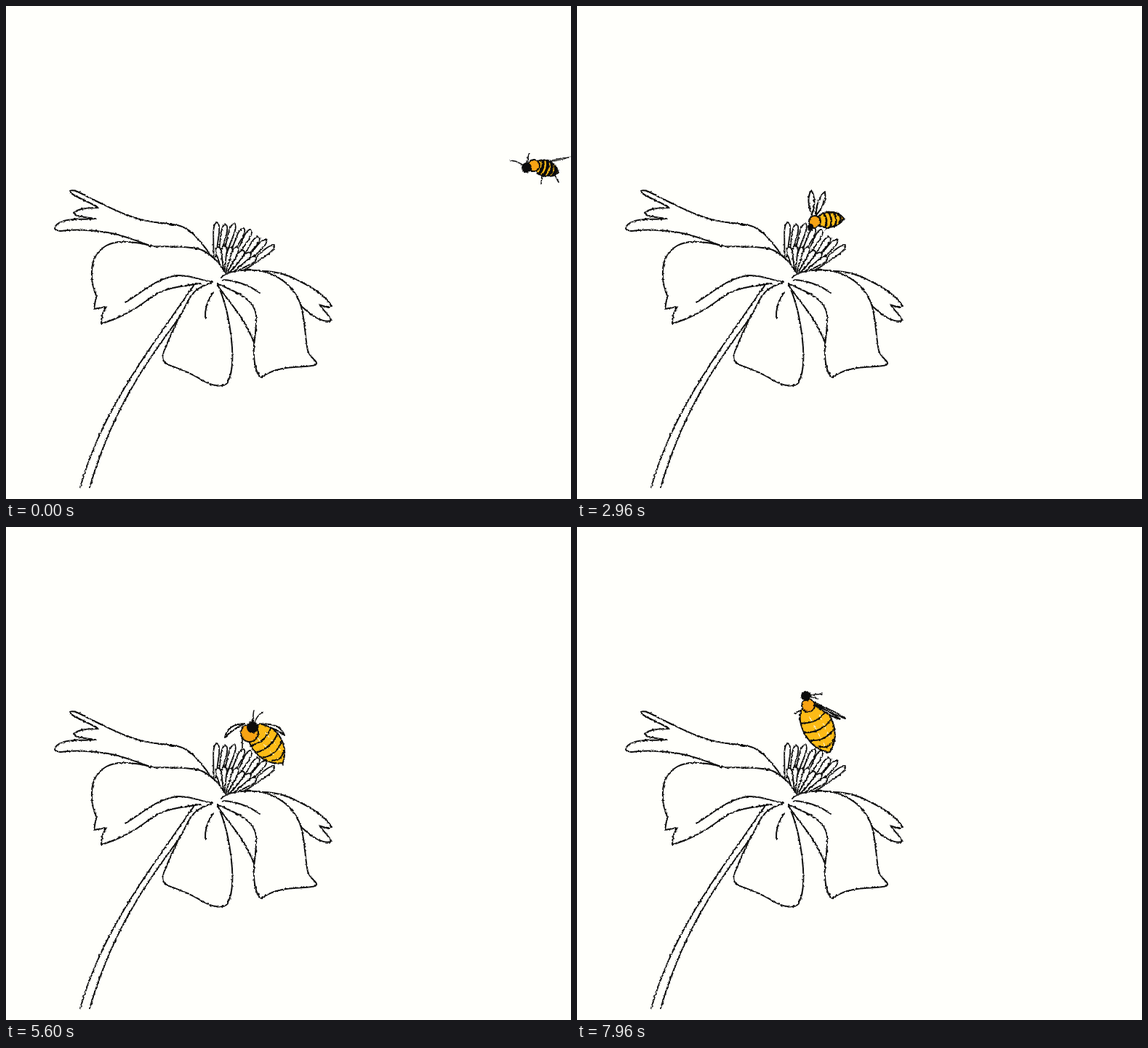
Recreate the animation shown at these times as an HTML page. Size 777 by 677 pixels, loop 8 s.

```html
<!DOCTYPE html>
<html lang="en">
<head>
<meta charset="utf-8">
<title>Bee on a flower</title>
<style>
  html, body { margin: 0; width: 100%; height: 100%; overflow: hidden; background: #fffffb; }
  svg { display: block; width: 777px; height: 677px; }
  g { fill: none; stroke: #0c0c0c; stroke-width: 2; stroke-linecap: round; stroke-linejoin: round; }
</style>
</head>
<body>
<svg viewBox="0 0 777 677">
  <defs>
    <filter id="rough0" filterUnits="userSpaceOnUse" x="0" y="0" width="777" height="677" color-interpolation-filters="sRGB">
      <feTurbulence type="fractalNoise" baseFrequency=".3" numOctaves="2" seed="3"/>
      <feDisplacementMap in="SourceGraphic" scale="3" xChannelSelector="R" yChannelSelector="G"/>
    </filter>
    <filter id="rough1" filterUnits="userSpaceOnUse" x="0" y="0" width="777" height="677" color-interpolation-filters="sRGB">
      <feTurbulence type="fractalNoise" baseFrequency=".3" numOctaves="2" seed="8"/>
      <feDisplacementMap in="SourceGraphic" scale="3" xChannelSelector="R" yChannelSelector="G"/>
    </filter>
    <g id="shared">
      <!-- lower petal -->
      <path d="M291 382C302 406 307 430 310 458C313 485 311 506 304 518C298 524 284 522 270 514C250 501 236 498 224 493C216 489 214 484 216 478C222 460 232 440 240 424"/>
      <path d="M285 393C277 404 273 416 274 430"/>
      <!-- right petals -->
      <path d="M296 373C303 364 330 360 352 364C385 372 401 395 406 413C412 437 411 455 415 473C418 484 429 487 427 492C422 496 410 494 396 496C380 497 363 501 351 510C343 505 340 486 341 465C343 450 345 437 344 424C341 404 321 394 292 382"/>
      <path d="M348 364C375 363 393 372 410 381C427 390 440 400 448 412C442 415 436 412 431 410C437 419 446 426 447 432C436 436 420 425 406 412"/>
      <path d="M164 407C184 396 203 375 235 370C254 369 268 377 284 379"/>
    </g>
  </defs>
  <g id="flower0" filter="url(#rough0)">
    <use href="#shared"/>
    <path d="M284 345C267 323 255 305 236 301C216 297 202 298 184 293C158 286 138 274 118 265C106 259 95 251 88 254C88 260 112 267 127 277C112 277 99 278 93 284C97 290 110 290 123 292C104 294 82 290 70 300C65 305 66 308 75 309C100 306 118 308 140 311C164 315 182 324 202 330"/>
    <path d="M302 366C292 350 281 340 267 334C245 329 225 331 202 330C184 325 156 319 138 329C118 340 116 360 119 382C122 393 126 399 123 404L121 416L138 413C133 420 131 428 131 436C150 431 175 419 194 404C216 386 240 385 268 381"/>
    <path d="M298 376C318 377 335 384 349 394M294 388C310 410 329 430 341 462"/>
    <path d="M258 384C246 402 206 457 180 497C148 547 120 598 102 661M282 380C266 386 258 391 252 402L240 425C216 459 196 484 178 516C148 565 129 614 115 661"/>
  </g>
  <g id="flower1" filter="url(#rough1)">
    <use href="#shared"/>
    <path d="M275 338C258 317 247 306 230 302C202 299 183 292 160 285C141 278 127 271 113 264C106 257 96 253 87 256C91 264 110 268 127 277C112 277 99 278 93 283C97 290 110 290 123 292C104 295 82 288 68 299C65 303 74 308 80 310C106 309 128 309 150 314C170 319 182 327 198 333"/>
    <path d="M299 366C292 350 281 341 267 335C245 330 225 331 198 333C184 325 156 322 138 332C117 343 115 360 118 380C121 393 126 399 122 405L121 416L138 413C132 420 131 428 134 437C153 431 176 419 194 404C216 386 240 383 270 383"/>
    <path d="M299 376C318 377 332 383 344 394M297 388C310 410 326 430 341 455"/>
    <path d="M257 385C243 405 206 457 180 497C148 547 121 598 103 661M284 379C266 386 258 391 252 402L236 432C216 459 197 487 179 516C149 565 130 614 115 661"/>
  </g>
  <g id="bee" filter="url(#rough0)"></g>
</svg>
<script>
const LOOP = 8000, BEE_STEP = 80;
const PAPER = '#fffffb', INK = '#0c0c0c', GOLD = '#fdbb16', ORANGE = '#f8a314';
const byId = id => document.getElementById(id);

// Two rows of stamens: root x, y, tip x, y.
const backRow = [[287, 345, 290, 297], [294, 340, 302, 300], [301, 340, 314, 299], [309, 342, 327, 305],
  [317, 343, 337, 307], [325, 349, 348, 317], [326, 356, 358, 321], [328, 361, 369, 329]];
const frontRow = [[297, 358, 291, 331], [301, 364, 300, 329], [302, 365, 309, 331], [304, 365, 318, 331],
  [307, 364, 327, 336], [313, 363, 336, 339], [320, 361, 344, 345]];

function stamen([x, y, tx, ty]) {
  const dx = tx - x, dy = ty - y, len = Math.hypot(dx, dy);
  const at = (u, v) => `${x + dx * u - dy / len * v} ${y + dy * u + dx / len * v}`;
  return `<path fill="${PAPER}" stroke-width="1.8" d="M${at(0, -1.5)}L${at(.72, -4)}Q${at(.98, -4)} ${at(1, 0)}Q${at(.98, 4)} ${at(.72, 4)}L${at(0, 1.5)}"/>`;
}
const stamens = [...backRow, ...frontRow].map(stamen).join('');
for (const id of ['flower0', 'flower1']) byId(id).insertAdjacentHTML('beforeend', stamens);

// head, thorax: x, y, radius; body: front, tail, width; wings: root and tip twice;
// vane: bend, width; feelers: two tips; legs: root and tip twice.
const arriving = {
  head: [716, 222, 6], thorax: [726, 219, 8], body: [728, 219, 760, 228, 21], stripe: [4],
  wings: [746, 214, 776, 207, 748, 213, 774, 208], vane: [2, 0],
  feelers: [694, 212, 720, 202], legs: [737, 232, 736, 244, 754, 231, 760, 242]
};
const hovering = {
  head: [382, 240, 6], thorax: [391, 231, 9], body: [394, 224, 415, 250, 22], stripe: [3],
  wings: [389, 224, 404, 196, 402, 222, 430, 204], vane: [6, 0],
  feelers: [356, 236, 366, 234], legs: [384, 245, 385, 252, 403, 247, 405, 256]
};
const landed = {
  head: [321, 303, 3], thorax: [327, 296, 8], body: [332, 295, 367, 291, 21], stripe: [2.6],
  wings: [323, 287, 322, 253, 329, 287, 341, 255], vane: [0, 8],
  feelers: [318, 307, 320, 308], legs: [325, 302, 319, 308, 345, 303, 341, 308]
};
const dipping = {
  head: [322, 300, 2], thorax: [326, 297, 9], body: [327, 296, 391, 248, 43], stripe: [2],
  wings: [318, 288, 295, 262, 323, 284, 311, 253], vane: [0, 6],
  feelers: [316, 303, 319, 305], legs: [325, 301, 318, 306, 345, 299, 340, 307]
};
const perched = {
  head: [339, 275, 7], thorax: [335, 283, 12], body: [341, 277, 382, 323, 40], stripe: [2],
  wings: [328, 270, 301, 289, 352, 271, 383, 286], vane: [8, 5],
  feelers: [341, 252, 353, 255], legs: [325, 292, 325, 306, 379, 318, 381, 328]
};
const resting = { ...perched, wings: [328, 270, 306, 290, 352, 271, 381, 288], vane: [8, 8] };
const leaving = {
  head: [315, 232, 6], thorax: [318, 245, 9], body: [318, 246, 349, 309, 42], stripe: [2],
  wings: [326, 243, 369, 263, 327, 244, 362, 264], vane: [-1, 3],
  feelers: [337, 229, 331, 236], legs: [311, 250, 299, 256, 311, 251, 305, 265]
};

// Start time, pose, and the height of the arc towards the next pose.
const track = [[0, arriving, 24], [1120, hovering, 0], [1920, landed, 0], [2960, landed, 0], [3680, dipping, 0],
  [4400, dipping, 18], [5600, perched, 0], [5680, resting, 0], [7120, resting, 0], [7920, leaving, 0], [LOOP, leaving, 0]];

function poseAt(time) {
  const i = track.findLastIndex(key => key[0] <= time);
  const [start, from, lift] = track[i], [end, to] = track[i + 1];
  const k = (time - start) / (end - start), pose = {};
  for (const part in from) pose[part] = from[part].map((v, n) => v + (to[part][n] - v) * k);
  if (time < 1920 && time / BEE_STEP % 2) for (const n of [3, 7]) pose.wings[n] -= 10;
  pose.lift = -lift * Math.sin(Math.PI * k);
  return pose;
}

const disc = ([x, y, r], fill) => `<circle cx="${x}" cy="${y}" r="${r}" fill="${fill}"/>`;

function wing(x, y, tx, ty, bend, width) {
  const dx = tx - x, dy = ty - y, len = Math.hypot(dx, dy) || 1;
  const mid = v => `${x + dx * .6 + dy / len * v} ${y + dy * .6 - dx / len * v}`;
  const fill = width > 1 ? PAPER : 'none';
  return `<path fill="${fill}" stroke-width="${width > 1 ? 2 : 1.2}" d="M${x} ${y}Q${mid(bend + width)} ${tx} ${ty}Q${mid(bend - width)} ${x} ${y}"/>`;
}

function abdomen([x, y, tx, ty, width], stripe) {
  const dx = tx - x, dy = ty - y, len = Math.hypot(dx, dy);
  const at = (u, v) => `${x + dx * u - dy / len * width * v} ${y + dy * u + dx / len * width * v}`;
  const bands = [.24, .43, .62, .8].map(u => {
    const h = .5 * Math.sin(Math.PI * (.15 + .85 * u));
    return `M${at(u, h)}Q${at(u + .15, 0)} ${at(u, -h)}`;
  }).join('');
  const shine = width > 30
    ? `<path stroke="#fff4cc" stroke-width="1.2" stroke-dasharray="7 6" d="M${at(.2, .12)}L${at(.85, .08)}M${at(.25, -.2)}L${at(.75, -.18)}"/>` : '';
  return `<path fill="${GOLD}" d="M${at(0, .25)}C${at(.2, .62)} ${at(.75, .62)} ${at(1, .04)}C${at(.75, -.62)} ${at(.2, -.62)} ${at(0, -.25)}Z"/>
    ${shine}<path stroke-width="${stripe}" d="${bands}"/>`;
}

function drawBee(p) {
  const [hx, hy] = p.head, w = p.wings, f = p.feelers, l = p.legs;
  const feeler = (x, y) => `M${hx} ${hy}Q${(hx + x) / 2} ${Math.min(hy, y) + 1} ${x} ${y}`;
  byId('bee').setAttribute('transform', `translate(0 ${p.lift})`);
  byId('bee').innerHTML =
    `<path stroke-width="1.6" d="M${l[0]} ${l[1]}L${l[2]} ${l[3]}M${l[4]} ${l[5]}L${l[6]} ${l[7]}"/>` +
    abdomen(p.body, p.stripe[0]) +
    wing(...w.slice(0, 4), -p.vane[0], p.vane[1]) + wing(...w.slice(4), p.vane[0], p.vane[1]) +
    disc(p.thorax, ORANGE) +
    `<path stroke-width="1.6" d="${feeler(f[0], f[1])}${feeler(f[2], f[3])}"/>` +
    disc(p.head, INK);
}

let drawnStep = -1;
function frame(now) {
  const time = now % LOOP, phase = time % 200;
  const second = phase >= 80 && phase < 160;
  byId('flower0').style.display = second ? 'none' : '';
  byId('flower1').style.display = second ? '' : 'none';
  const step = Math.floor(time / BEE_STEP);
  if (step !== drawnStep) drawBee(poseAt(step * BEE_STEP));
  drawnStep = step;
  requestAnimationFrame(() => frame(performance.now() - began));
}
const began = performance.now();
frame(0);
</script>
</body>
</html>
```
